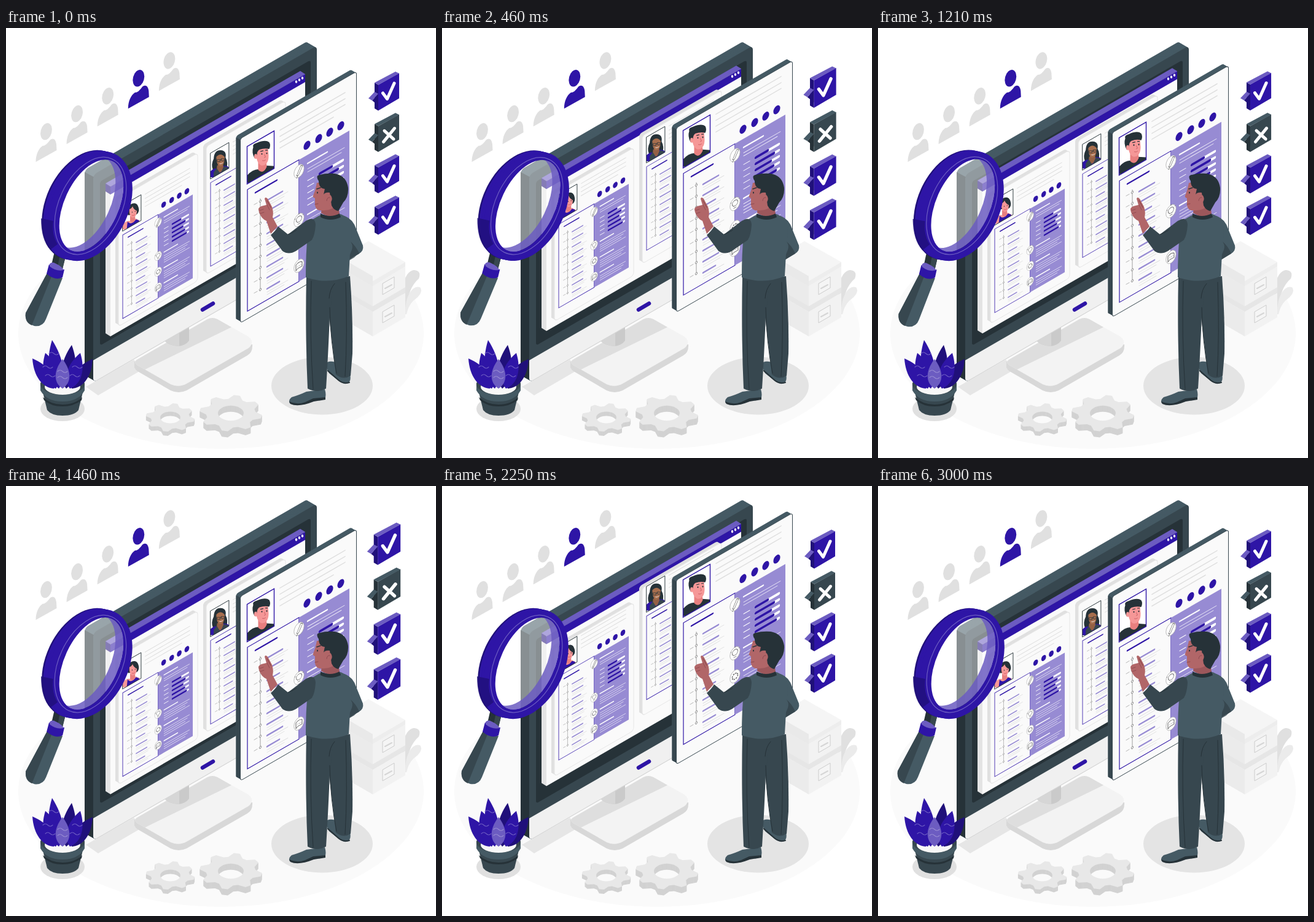
Animation, 700 px wide and 700 px high, one loop 3040 ms. Source, as an HTML page:

```html
<!DOCTYPE html>
<html lang="en">
<head>
<meta charset="utf-8">
<title>Candidate selection</title>
<style>
html, body { margin: 0; width: 100%; height: 100%; overflow: hidden; background: #fff; }
svg { display: block; width: 100vw; height: 100vh; }
</style>
</head>
<body>
<svg id="stage" viewBox="0 0 700 700"></svg>
<script>
const INK = '#263238', SLATE = '#37474f', STEEL = '#455a64';
const VIO = '#2e15a6', DEEP = '#20107a', MID = '#6c5cc1', PALE = '#978bd3', SKIN = '#b16668';

// --- drawing helpers ---
const path = (d, fill, more = '') => `<path d="${d}" fill="${fill}" ${more}/>`;
const poly = (pts, fill, more = '') => `<polygon points="${pts}" fill="${fill}" ${more}/>`;
const line = (d, color, w, more = '') =>
  path(d, 'none', `stroke="${color}" stroke-width="${w}" stroke-linecap="round" stroke-linejoin="round" ${more}`);
const oval = (x, y, rx, ry, fill, more = '') =>
  `<ellipse cx="${x}" cy="${y}" rx="${rx}" ry="${ry}" fill="${fill}" ${more}/>`;
const rect = (x, y, w, h, fill, more = '') =>
  `<rect x="${x}" y="${y}" width="${w}" height="${h}" fill="${fill}" ${more}/>`;
const at = (x, y, body, more = '') => `<g transform="translate(${x} ${y}) ${more}">${body}</g>`;
const wall = (x, y, body, s = 1) => at(x, y, body, `scale(${s}) skewY(-30)`);
const lift = (k, body) => `<g data-lift="${k}">${body}</g>`;
const range = (n, f) => Array.from({ length: n }, (_, i) => f(i)).join('');

// Upright sheet, extruded back to the left; the left face has its own colour.
function sheet(x, y, w, h, r, depth, top, side, front, more = '') {
  const face = (d, fill, m = '') => wall(x - d, y - d * .577, rect(0, 0, w, h, fill, `rx="${r}" ${m}`));
  const back = depth * .577, a = y + r * .6, b = y + h - r * .6;
  return range(depth, i => face(depth - i, top)) +
    poly(`${x - depth},${a - back} ${x + 1},${a} ${x + 1},${b} ${x - depth},${b - back}`, side) +
    face(0, front, more);
}

// --- background ---
function person(i) {
  const c = i === 3 ? VIO : '#e0e0e0';
  return at(50.1 * i, -28.9 * i,
    oval(65.5, 168.5, 9, 14, c, 'transform="rotate(15 65.5 168.5)"') +
    path('M48.5 218 C48.5 206 53 196 60 191.5 Q64 193 72 182 Q80 177 82 189 L82.5 199 Z', c));
}

function archive() {
  const label = (y) => poly(`613,${y} 632,${y - 11} 632,${y + 7} 613,${y + 18}`, '#f5f5f5', 'stroke="#ccc"') +
    line(`M617 ${y + 8} L628 ${y + 2}`, '#d6d6d6', 2);
  const carton = (y) =>
    poly(`545,${y - 8} 597,${y + 22} 597,${y + 62} 545,${y + 32}`, '#ebebeb') +
    poly(`597,${y + 22} 650,${y - 9} 650,${y + 31} 597,${y + 62}`, '#f2f2f2');
  return path('M646 462 C643 425 647 397 664 394 Q677 395 672 408 Q653 424 652 462Z', '#e0e0e0') +
    path('M650 466 C649 438 661 418 674 422 Q681 431 663 444 Q655 452 652 466Z', '#ebebeb') +
    carton(440) +
    poly('545,422 597,452 650,421 650,431 597,462 545,432', '#e6e6e6') +
    carton(391) +
    poly('545,374 590,347 650,381 597,412', '#f5f5f5') +
    poly('545,374 597,404 597,420 545,390', '#e9e9e9') +
    poly('597,412 650,381 650,388 597,420', '#ededed') +
    label(416) + label(462);
}

function gear(x, y, rx, n, h) {
  let d = '';
  for (let i = 0; i < n * 4; i++) {
    const a = (i + .5) / (n * 4) * 2 * Math.PI, r = rx * (i % 4 < 2 ? 1 : .79);
    d += (i ? 'L' : 'M') + (r * Math.cos(a)).toFixed(1) + ' ' + (r * .58 * Math.sin(a)).toFixed(1);
  }
  const a = rx * .41, b = a * .58;
  d += `Z M${-a} 0 a${a} ${b} 0 1 0 ${2 * a} 0 a${a} ${b} 0 1 0 ${-2 * a} 0Z`;
  return range(h + 1, i => at(x, y + h - i, path(d, i < h ? '#d2d2d2' : '#e8e8e8', 'fill-rule="evenodd"')));
}

function plant() {
  const leaf = (bx, x, y, w, c) => {
    const by = 587, dx = x - bx, dy = y - by, l = Math.hypot(dx, dy);
    const px = -dy / l * w, py = dx / l * w;
    const side = (s, k) => `${bx + dx * k + s * px} ${by + dy * k + s * py}`;
    return path(`M${bx} ${by} C${side(1, .2)} ${side(1, .6)} ${x} ${y} C${side(-1, .6)} ${side(-1, .2)} ${bx} ${by}Z`, c);
  };
  const wave = (x, y) => line(`M${x - 8} ${y} q4 -4 8 0 t8 0`, MID, 1.1);
  return oval(92, 620, 36, 20, '#e0e0e0') +
    path('M58 585 L67 622 Q74 631 92 631 Q111 631 118 622 L127 585Z', SLATE) +
    path('M56 578 V590 Q66 608 92 608 Q118 608 128 590 V578Z', STEEL) +
    path('M60 601 Q73 613 92 613 Q112 613 124 601 L123 606 Q110 616 92 616 Q73 616 62 606Z', INK) +
    oval(92, 580, 36, 17, SLATE) + oval(92, 584, 29, 13, '#f7f7f7') +
    leaf(86, 75, 508, 15, VIO) + leaf(98, 107, 516, 15, DEEP) + leaf(78, 43, 538, 15, VIO) +
    leaf(107, 141, 539, 15, DEEP) + leaf(81, 64, 529, 16, VIO) + leaf(104, 121, 529, 16, VIO) +
    leaf(92, 92, 539, 15, MID) +
    wave(72, 566) + wave(68, 552) + wave(112, 566) + wave(116, 552) + wave(78, 530) +
    line('M84 559 q4 -4 8 0 t8 0 M84 569 q4 -4 8 0 t8 0', PALE, 1.1);
}

// --- monitor ---
function monitor() {
  return poly('130,584 208,540 222,556 150,598', '#e6e6e6') +
    path('M209 543 L209 552 Q210 557 218 561 L268 590 Q281 596 294 590 L393 533 Q402 528 401 515Z', '#d8d8d8') +
    path('M213 540 L328 474 Q336 470 344 474 L394 502 Q406 511 395 521 L294 579 Q281 586 268 580 L214 549 Q207 544 213 540Z', '#f3f3f3') +
    path('M213 540 L328 474 Q336 470 344 474 L367 487 L226 556 L214 549 Q207 544 213 540Z', '#dedede') +
    path('M257 508 V480 H298 V509 Q292 517 281 518 Q264 517 257 508Z', '#cacaca') +
    path('M257 480 H282 V518 Q264 517 257 508Z', '#d6d6d6') +
    sheet(142, 239, 364, 338, 6, 14, STEEL, INK, SLATE) +
    wall(142, 541, path('M0 0 H364 V36 H8 Q0 36 0 29Z', '#f0f0f0') + line('M6 36 H364', '#d8d8d8', 1.3)) +
    wall(153, 250, rect(0, 0, 343, 267, INK, 'rx="4"')) +
    line('M320 458.5 L337 448.5', VIO, 6.5);
}

function screen() {
  return poly('162,253 170,258 170,502 162,497', '#e4e4e4') +
    wall(170, 258, rect(0, 0, 317, 244, '#fafafa') + rect(0, 0, 317, 13, VIO)) +
    poly('162,253 479,70 487,75 170,258', MID) +
    poly('162,253 170,258 170,271 162,266', DEEP) +
    [[472.5, 87.5], [477.5, 84.5], [482.5, 81.5]].map(([x, y]) => oval(x, y, 1.7, 2.3, '#fff')).join('');
}

const card = (x, y) => sheet(x - 7, y - 59, 129, 208, 5, 5, '#e0e0e0', '#e0e0e0', '#fafafa', 'stroke="#e6e6e6"');

// --- résumé: origin is the top-left corner of its framed box ---
const portraits = {
  man:
    path('M0 4 L0 -8 Q9 -18 18 -18 L31 -24 L46 -23 V4Z', INK) +
    path('M18 -34 L18 -17 Q26 -9 32 -22 L31 -34Z', '#e87f7f') +
    path('M14 -50 Q14 -27 24 -24 Q35 -25 35 -40 L34 -54 L18 -56Z', '#f59797') +
    path('M12 -36 Q7 -46 10 -54 Q8 -59 16 -61 Q30 -67 36 -62 Q39 -57 36 -51 Q28 -53 20 -50 Q16 -48 16 -40Z', INK) +
    oval(14, -39, 2.5, 4, '#f59797') +
    line('M22 -47 l4 -1 M30 -49 l3 0', INK, 1.2) + oval(24, -43, 1, 1.3, INK) + oval(32, -44, 1, 1.3, INK) +
    line('M28 -42 l2 4 l-2 1 M25 -32 q3 1 5 -1', '#c95c62', .9),
  scholar:
    path('M6 -16 Q1 -28 8 -42 Q9 -63 25 -62 Q39 -61 36 -45 Q43 -33 38 -18 L24 -8Z', INK) +
    path('M0 2 L0 -12 Q8 -20 16 -19 L31 -25 Q41 -26 46 -20 V2Z', VIO) +
    path('M16 -26 L15 -16 Q24 0 31 -22 L30 -30Z', '#946044') +
    path('M14 -46 Q15 -24 24 -24 Q34 -26 34 -46 Q24 -58 14 -46Z', '#a76e4e') +
    path('M8 -10 L15 -20 L24 -6 L32 -24 L42 -22 L36 2 L8 2Z', SLATE) +
    line('M16 -40 h7 v5 h-6z M26 -42 h7 v5 h-6z M23 -39 l3 -1', INK, 1.1) +
    line('M22 -30 q4 1 7 -2', '#fff', 1.2),
  artist:
    path('M13 -32 Q6 -50 18 -57 Q34 -66 38 -50 Q41 -40 34 -34Z', INK) +
    path('M0 2 L0 -10 Q10 -20 18 -18 L32 -24 L46 -16 V2Z', '#f59797') +
    path('M10 2 L12 -17 Q20 -6 32 -22 L39 -20 L42 2Z', VIO) +
    path('M18 -30 L18 -18 Q26 -10 30 -22 L30 -32Z', '#e87f7f') +
    path('M16 -46 Q16 -27 24 -26 Q34 -28 34 -42 Q26 -46 24 -53 Q21 -47 16 -46Z', '#f59797') +
    line('M23 -31 q4 1 6 -2', '#c9474f', 1) + oval(23, -39, .9, 1.2, INK) + oval(30, -41, .9, 1.2, INK),
};

function glyphs() {
  return line('M80 24 L87 11 L90 13 L83 25Z M82 25 l-2 3', '#666', .8) +
    line('M82 101 q-4 -4 -2 -7 q4 -4 8 0 q2 4 -2 7z M82 104 h4 M84 87 v2 M77 93 h1 M90 93 h1', '#666', .8) +
    `<circle cx="84" cy="135.5" r="4.5" fill="none" stroke="#666" stroke-width="1.8" stroke-dasharray="2.2 1.3"/>` +
    line('M79 178 V169 Q84 165 89 169 V176 H82Z M82 172.5 h.1 M84.5 172.5 h.1 M87 172.5 h.1', '#666', 1);
}

function resume(x, y, s, who) {
  const white = (v, a, b, w) => line(`M${a} ${v} H${b}`, '#fff', w);
  const block = (v, n) => white(v, 98, 130, 2.4) + range(n, i => white(v + 9 + i * 5, 98, 158 - i % 3 * 5, .8));
  const row = (i) => {
    const v = 36 + 18 * i;
    return line(`M32 ${v} H${i % 3 === 2 ? 52 : 57}`, PALE, 2.6) +
      line(`M32 ${v + 5.5} H66 M32 ${v + 9.5} H60`, '#dcdcdc', .9) +
      line(`M11 ${v - 5} H16`, '#b5b5b5', 1) +
      `<circle cx="21" cy="${v - 5}" r="1.7" fill="#fafafa" stroke="#777" stroke-width=".7"/>`;
  };
  const bar = (i) => {
    const v = 42 + 10 * i, end = [137, 147, 142, 146, 150][i];
    return white(v, 98, 108, 1.1) + white(v, 118, 155, 4.4) + line(`M118 ${v} H${end}`, VIO, 4.4);
  };
  const flat =
    line('M53 -66 H159 M53 -56 H159 M53 -46.5 H159 M53 -37 H140', '#dedede', 1.6) +
    [97, 116, 134, 152].map(u => oval(u, -16, 5.6, 6.6, VIO)).join('') +
    rect(0, 0, 84, 198, '#fafafa', `stroke="${VIO}" stroke-width="1.2"`) +
    rect(84, 0, 82, 198, PALE) +
    line('M13 12.5 H48', VIO, 2.5) +
    line('M21 27 V177', '#888', .7) + range(9, row) +
    block(14, 2) + range(5, bar) + block(97, 4) + block(134, 4) + block(170, 3) +
    [18.5, 98, 135.5, 172.5].map(v => oval(84, v, 8.2, 10, '#fff', 'stroke="#aaa" stroke-width=".7"')).join('') +
    glyphs();
  const id = 'clip-' + who, frame = '0,0 44,-25.4 44,-86.4 0,-61';
  const photo = `<clipPath id="${id}"><polygon points="${frame}"/></clipPath>` +
    poly(frame, '#fff') +
    `<g clip-path="url(#${id})">${at(0, -6, portraits[who])}</g>` +
    poly(frame, 'none', `stroke="${who === 'man' ? VIO : INK}" stroke-width="1.4"`);
  return wall(x, y, flat, s) + at(x, y, at(-.5, -9, photo), `scale(${s})`);
}

// --- magnifier ---
function magnifier() {
  const loop = (rx, ry) => `M${-rx} 0 a${rx} ${ry} 0 1 0 ${2 * rx} 0 a${rx} ${ry} 0 1 0 ${-2 * rx} 0Z`;
  const tilted = (x, y, d, fill, more = '') => at(x, y, path(d, fill, 'fill-rule="evenodd" ' + more), 'rotate(25)');
  const hole = loop(44, 80), edge = loop(62, 94);
  const rim = (k, fill) => tilted(127 + 10 * k, 288 + 2 * k, edge, fill);
  return path('M79 364 L98 368 L91 396 L73 390Z', INK) + path('M88 368 L98 368 L91 396 L83 394Z', SLATE) +
    path('M67 399 L92 407 L65 474 Q60 487 46 485 Q30 480 32 464Z', STEEL) +
    path('M67 399 L75 402 L42 484 Q30 479 32 464Z', SLATE) +
    path('M70 385 Q82 396 95 393 L92 406 Q80 412 66 400Z', VIO) +
    path('M71 384 Q75 380 80 383 Q91 388 94 394 Q82 397 71 388Z', MID) +
    `<clipPath id="lens">${tilted(139, 289, hole, '#000').replace(/<\/?g[^>]*>/g, '')
      .replace('<path', '<path transform="translate(139 289) rotate(25)"')}</clipPath>` +
    `<mask id="ring"><rect width="300" height="420" fill="#fff"/>${tilted(139, 289, hole, '#000')}</mask>` +
    tilted(139, 289, hole, '#fff', 'opacity=".45"') +
    `<g clip-path="url(#lens)">${tilted(126, 283, loop(300, 300) + hole, MID, 'opacity=".85"')}</g>` +
    `<g mask="url(#ring)">${rim(0, DEEP) + rim(.25, VIO) + rim(.6, VIO) + rim(1, VIO)}` +
    path('M57 310 Q57 345 72 361 L84 352 Q74 336 77 314Z', DEEP, 'opacity=".8"') + '</g>' +
    tilted(137.5, 289.5, loop(51, 84), 'none', `stroke="${MID}" stroke-width="1.2"`);
}

// --- speech badges ---
function badge(i) {
  const no = i === 1;
  const [face, side, top] = no ? [SLATE, INK, STEEL] : [VIO, DEEP, MID];
  const mark = no ? 'M614.5 118 L632.5 96 M616 100 L631 113.5' : 'M613.5 106 L620.5 115.5 L632 90';
  return at(0, 67.3 * i,
    poly('600,89 606,92.5 606,134.5 600,131', side) +
    poly('606,92.5 640,73.5 640,114.5 606,134.5', face) +
    poly('600,89 634,71 640,74 606,92.5', top) +
    poly('596,118 606,107 606,126', side) +
    poly('590,114.5 600,104 606,107 596,118', top) +
    line(mark, '#fff', 5));
}

// --- man pointing at the sheet ---
function presenter() {
  return oval(514.5, 582.5, 82.5, 47, '#e4e4e4') +
    path('M523 544 Q530 541 538 545 L560 563 Q563 577 554 579 Q548 580 541 574 L526 562 Q521 556 523 544Z', STEEL) +
    line('M524 558 L541 573 Q549 580 559 577', INK, 2) +
    path('M524 408 L560 404 Q565 470 564 530 L561 566 Q549 574 537 564 L526 470Z', SLATE) +
    path('M489 592 Q476 598 465 601 Q459 606 462 611 Q474 615 486 611 L500 605 L519 604 Q522 598 519 588Z', STEEL) +
    path('M461 608 Q474 614 487 609 L500 603 L520 601 V605 L501 608 Q476 618 463 612Z', INK) +
    path('M489 404 L534 408 Q530 440 527 470 Q524 540 521 587 Q506 595 491 587 Q487 500 489 404Z', SLATE) +
    line('M497 412 Q494 500 500 588 M526 440 Q527 425 535 416 M527 455 Q528 510 538 562 M553 414 Q556 500 552 567', INK, 1) +
    path('M551 306 Q565 311 570 327 L581 354 Q583 363 574 368 L555 379 L549 340Z', STEEL) +
    path('M559 346 Q566 352 563 361 L556 379 L575 367 Q570 355 559 346Z', SLATE) +
    path('M500 311 L514 303 Q530 309 545 303 L555 308 Q566 318 561 350 L558 404 Q524 418 488 406 Q488 365 491 338Z', STEEL) +
    path('M431 337 Q439 330 443 323 L459 336 L488 314 Q503 305 504 320 Q503 337 498 345 L472 363 Q460 370 450 363Z', SLATE) +
    line('M459 336 Q466 334 473 329', INK, 1) +
    path('M431 335 L424 314 Q416 311 412 300 Q409 292 416 290 L424 288 L421 278 Q422 274 426 278 L433 291 Q436 300 434 308 L442 323Z', SKIN) +
    line('M413 297 l6 -2 M414 302 l6 -2 M425 288 l4 8', '#8e4a50', .9) +
    line('M425 281 L431 292', '#8e4a50', 1.2) +
    path('M513 301 L514 290 L541 286 L543 303 Q528 311 513 301Z', '#9c575b') +
    path('M512 302 Q527 310 543 302 L545 308 Q528 316 512 308Z', INK) +
    path('M506 252 Q504 264 500 273 Q499 276 503 277 L503 288 Q504 298 515 297 Q531 298 540 286 L538 250Z', SKIN) +
    path('M509 249 Q503 240 511 239 Q521 236 535 237 Q554 240 557 260 Q558 275 549 284 L541 298 Q534 297 530 289 L527 268 Q520 267 517 271 L519 262 Q509 261 509 249Z', INK) +
    oval(524.5, 279, 6, 8, SKIN, 'transform="rotate(15 524.5 279)"') +
    line('M522 281 q1 -6 5 -5', '#8e4a50', 1) +
    line('M506 262 l6 -2', INK, 1.4) + oval(507, 268, 1, 1.5, INK) + line('M503 287 l5 -1', '#8e4a50', 1);
}

const stage = document.getElementById('stage');
stage.innerHTML =
  oval(350, 497, 330, 188, '#fafafa') + range(5, person) + archive() + monitor() +
  lift(.5, screen() + card(190, 337)) +
  lift(1, resume(190, 337, .687, 'artist') + card(333, 252)) +
  lift(1.5, resume(333, 252, .687, 'scholar')) +
  `<g id="glass">${magnifier()}</g>` +
  lift(1, sheet(381.5, 180, 189, 300, 4, 7, STEEL, SLATE, '#fafafa', `stroke="${SLATE}"`)) +
  lift(1.5, resume(393, 263, 1, 'man')) +
  `<g id="badges">${range(4, badge)}</g>` +
  gear(267.5, 634, 40, 8, 7) + gear(366, 627, 51, 8, 10) + plant() + presenter();

// --- motion: [time in ms, value] ---
const LOOP = 3040;
const RISE = [[0, 0], [460, -17.4], [750, -28], [920, -20.4], [1460, -.3], [1500, 0],
  [1790, -10.2], [2250, -26.8], [2285, -28], [3000, 0], [LOOP, 0]];
const BEAT = [[0, 1], [300, 1.1], [760, 1], [1200, 1], [1500, 1.1], [1800, 1], [LOOP, 1]];
const SWAY = [[0, 0], [375, 1], [1125, -1], [1500, 0], [1875, 1], [2625, -1], [3000, 0], [LOOP, 0]];

function value(keys, t) {
  const i = keys.findIndex(k => k[0] > t), [t0, a] = keys[i - 1], [t1, b] = keys[i];
  return a + (b - a) * (t - t0) / (t1 - t0);
}

const lifts = [...stage.querySelectorAll('[data-lift]')];
const glass = document.getElementById('glass'), badges = document.getElementById('badges');

function draw(now) {
  const t = now % LOOP, rise = value(RISE, t);
  for (const g of lifts) g.setAttribute('transform', `translate(0 ${rise * g.dataset.lift})`);
  glass.setAttribute('transform', `rotate(${value(SWAY, t)} 119 343)`);
  badges.setAttribute('transform', `translate(615 203.5) scale(${value(BEAT, t)}) translate(-615 -203.5)`);
}

const start = performance.now();
function tick() {
  draw(performance.now() - start);
  requestAnimationFrame(tick);
}
tick();
</script>
</body>
</html>
```
